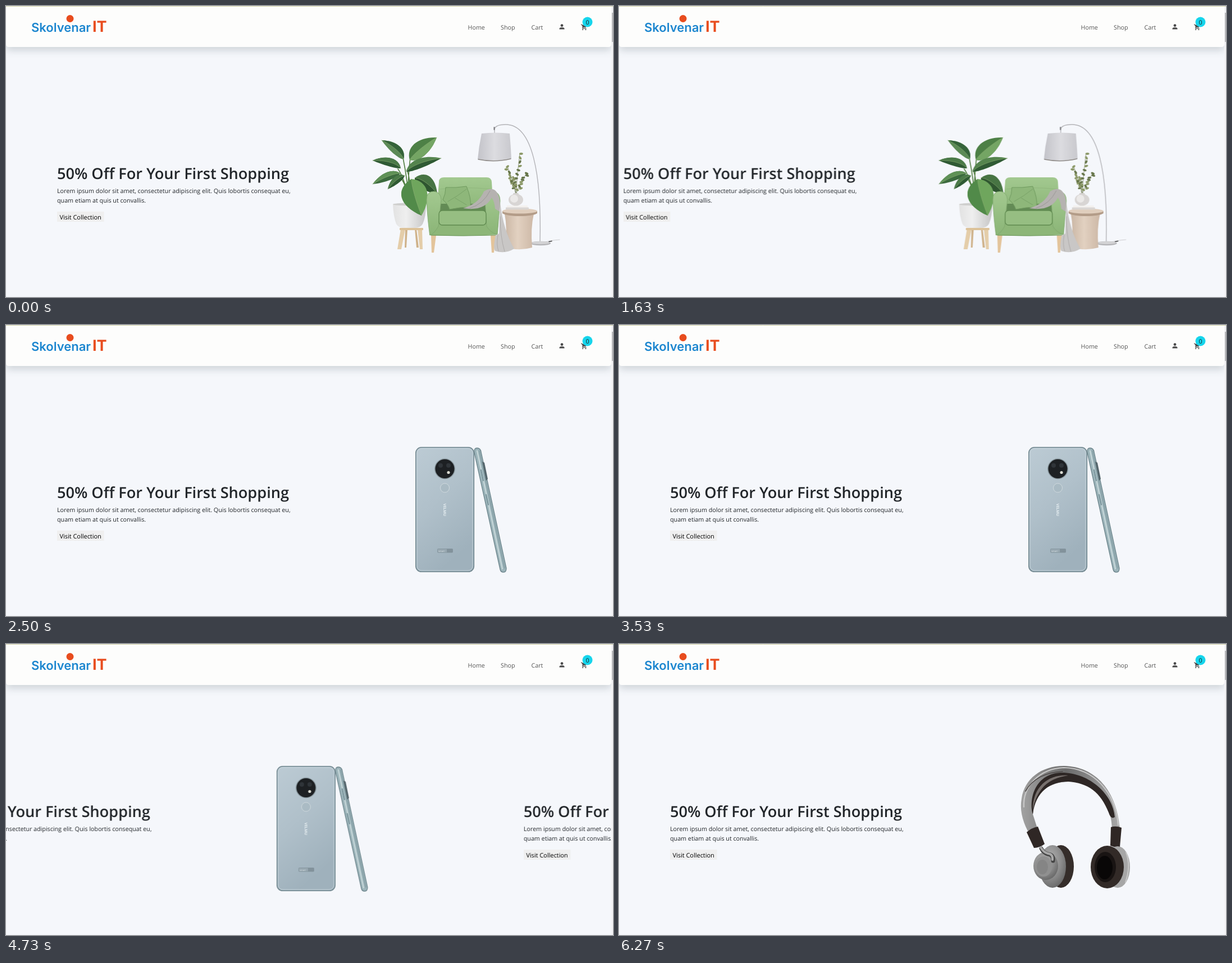
Write an HTML page that moves like this. It is 1081x518 px and loops after 6.31 s.

```html
<!DOCTYPE html>
<html lang="en">
<head>
<meta charset="utf-8">
<title>Shop carousel</title>
<style>
html, body { margin: 0; width: 100%; height: 100%; overflow: hidden; background: #f5f7fb; }
svg { display: block; width: 1081px; height: 518px; }
text { font-family: "Open Sans", "Noto Sans", sans-serif; font-size: 10.73px; fill: #212529; text-rendering: geometricPrecision; }
.title { font-size: 27.1px; font-weight: 600; }
.button { font-size: 10.95px; fill: #000; }
.nav text { fill: #555; }
.brand { font-family: Inter, sans-serif; font-size: 22px; font-weight: 600; fill: #1c86cf; }
.brand-end { font-family: Inter, sans-serif; font-size: 27px; font-weight: 700; fill: #e84c1e; }
.tiny { font-size: 6.5px; font-weight: 700; fill: #e6eef1; }
.header { filter: drop-shadow(0 6px 7px rgba(20, 40, 50, .17)); }
</style>
</head>
<body>
<svg viewBox="0 0 1081 518" xmlns="http://www.w3.org/2000/svg">
  <defs>
    <linearGradient id="shade"><stop stop-color="#c3c3c9"/><stop offset=".5" stop-color="#dcdce0"/><stop offset="1" stop-color="#c9c9ce"/></linearGradient>
    <linearGradient id="pot"><stop stop-color="#e2e2e2"/><stop offset=".4" stop-color="#efefef"/><stop offset="1" stop-color="#c6c6c6"/></linearGradient>
    <linearGradient id="table"><stop stop-color="#cbb7a5"/><stop offset=".45" stop-color="#e2d1c1"/><stop offset="1" stop-color="#cdb8a6"/></linearGradient>
    <linearGradient id="green" x2="0" y2="1"><stop stop-color="#a3c990"/><stop offset="1" stop-color="#8bb577"/></linearGradient>
    <linearGradient id="phone" x2=".4" y2="1"><stop stop-color="#bccbd4"/><stop offset=".5" stop-color="#b0c0ca"/><stop offset="1" stop-color="#9fb1bc"/></linearGradient>
    <linearGradient id="band"><stop stop-color="#a2a2a2"/><stop offset=".45" stop-color="#6b6b6b"/><stop offset="1" stop-color="#a8a8a8"/></linearGradient>
    <radialGradient id="cup" cx=".4" cy=".35" r=".7"><stop stop-color="#b2b2b2"/><stop offset=".6" stop-color="#8c8c8c"/><stop offset="1" stop-color="#666"/></radialGradient>
  </defs>

  <g id="track"></g>

  <path class="header" d="M0 0H1078V68Q1078 73 1073 73H5Q0 73 0 68Z" fill="#fdfdfc"/>
  <path d="M0 .5H1081" stroke="#d3d3a8"/>
  <circle cx="114" cy="22.5" r="6.5" fill="#e84c1e"/>
  <text class="brand" x="45" y="46">Skolvenar</text>
  <text class="brand-end" x="154" y="46">IT</text>
  <g class="nav">
    <text x="822.5" y="41.5">Home</text>
    <text x="881" y="41.5">Shop</text>
    <text x="935.5" y="41.5">Cart</text>
  </g>
  <g fill="#4b4b4b">
    <circle cx="990" cy="34.7" r="2.4"/>
    <path d="M985.5 41.5V40Q986 38 990 38T994.5 40V41.5Z"/>
    <path transform="translate(1023.4 31.4) scale(.53)" d="M7 18a2 2 0 1 0 0 4 2 2 0 0 0 0-4zM1 2v2h2l3.6 7.6-1.4 2.4c-.7 1.3.3 3 1.8 3h12v-2H7.4l1.1-2h7.5c.7 0 1.4-.4 1.7-1l3.6-6.5c.4-.7-.1-1.5-.9-1.5H5.2l-.9-2zM17 18a2 2 0 1 0 0 4 2 2 0 0 0 0-4z"/>
  </g>
  <circle cx="1035.5" cy="28.5" r="9" fill="#16d5ec"/>
  <text x="1035.5" y="32.5" text-anchor="middle">0</text>

  <rect x="1078" width="3" height="518" y="1" fill="#f3f3f5"/>
  <rect x="1079" y="12" width="2" height="52" fill="#b9b9bb"/>
</svg>
<script>
const WIDTH = 1078, LOOP = 6310;

const path = (d, fill, extra = '') => `<path d="${d}" fill="${fill}" ${extra}/>`;
const line = (d, stroke, w = 1) => path(d, 'none', `stroke="${stroke}" stroke-width="${w}" stroke-linecap="round"`);
const oval = (x, y, rx, ry, fill, extra = '') =>
  `<ellipse cx="${x}" cy="${y}" rx="${rx}" ry="${ry}" fill="${fill}" ${extra}/>`;
const box = (x, y, w, h, r, fill, extra = '') =>
  `<rect x="${x}" y="${y}" width="${w}" height="${h}" rx="${r}" fill="${fill}" ${extra}/>`;

// Leaf from base to tip: w is the half width, bend pushes the midrib sideways
function leaf(x0, y0, x1, y1, w, bend, light, dark) {
  const dx = x1 - x0, dy = y1 - y0, len = Math.hypot(dx, dy);
  const at = (k, s) => `${x0 + dx * k - dy / len * s} ${y0 + dy * k + dx / len * s}`;
  const curve = s => `C${at(.15, bend + s)} ${at(.6, bend + s)} ${x1} ${y1}`;
  const back = s => `C${at(.6, bend + s)} ${at(.15, bend + s)} ${x0} ${y0}`;
  const start = `M${x0} ${y0}`, side = w * 1.4;
  return path(start + curve(side) + back(-side), light)
    + path(start + curve(side) + back(0), dark)
    + line(start + curve(0), '#8aac70', .7);
}

function sprigs() {
  let seed = 7, out = '';
  const rnd = () => (seed = seed * 16807 % 2147483647) / 2147483647;
  for (const [x, y] of [[915, 263], [893, 286], [927, 298], [903, 306]]) {
    out += line(`M908 336Q${908 + (x - 908) * .3} ${(y + 336) / 2} ${x} ${y}`, '#76805c', .8);
    for (let k = .3; k <= 1; k += .1) {
      const px = 908 + (x - 908) * k + rnd() * 8 - 4, py = 336 + (y - 336) * k;
      out += oval(px, py, 3.4, 1.9, rnd() > .5 ? '#66754a' : '#8c9968',
        `transform="rotate(${rnd() * 140 - 70} ${px} ${py})"`);
    }
  }
  return out;
}

const lamp =
  line('M951 421C954 300 938 211 890 211Q872 211 870 219V226', '#b3b3b7', 1.4) +
  line('M869.5 216V220', '#77777b', 2) +
  line('M955 422Q968 417 986 416', '#c2c2c4', .8) + line('M967 419.5L972 418.5', '#444', 1.4) +
  oval(952, 422.5, 18, 3.8, '#b4b4b7') + oval(952, 421.5, 16, 2.6, '#d3d3d5') +
  path('M847 227Q872 224 897 227Q899 250 900 272Q870 279 840 273Q842 250 847 227Z', 'url(#shade)') +
  line('M841 273Q870 279 899 272', '#8f8b88', 1.3);

const plant =
  line('M718 355Q716 315 707 270M718 355Q714 315 720 270M718 355Q712 310 698 290M718 355Q722 310 714 292M718 355Q714 315 698 300', '#4f7c3e', 1.6) +
  leaf(728, 306, 768, 334, 12, -6, '#477443', '#2f5630') +
  leaf(708, 273, 669, 239, 8, 6, '#5c8a56', '#35633a') +
  leaf(719, 274, 767, 234, 13, -4, '#4d8046', '#74a564') +
  leaf(703, 289, 653, 275, 7, 7, '#2f5a34', '#4b7a48') +
  leaf(713, 295, 775, 271, 8, -7, '#54844e', '#2f5a34') +
  leaf(702, 298, 653, 317, 7, 4, '#3c6b3e', '#5f9156') +
  leaf(710, 302, 680, 326, 6, 4, '#2f5a34', '#4b7a48') +
  path('M703 397H711L704 433H697ZM733 397H741L742 433H737Z', '#e4cda9') +
  path('M711 397H715L713 430H710ZM728 397H731L735 430H731Z', '#cfb28a') +
  box(701, 395, 42, 4, 1, '#dcc299') +
  path('M689 353H748Q748 375 742 388Q738 395 728 395H709Q699 395 695 388Q690 375 689 353Z', 'url(#pot)') +
  oval(718.5, 353, 29.5, 2.5, '#cfcfce') +
  leaf(722, 308, 740, 373, 22, 3, '#6fa65d', '#518a49');

const chair =
  path('M757 408H766L762 439H758ZM863 408H872L869 439H865Z', '#e3c49b') +
  path('M771 313Q771 305 780 305H856Q864 305 865 313L868 366H767Z', 'url(#green)') +
  line('M773 326Q818 321 863 326', '#8db47a', .8) +
  path('M765 352H862V390H765Z', '#638b55') +
  path('M783 323Q802 324 820 321Q829 342 827 358Q808 358 790 362Q787 352 778 345Q783 335 783 323Z', '#8eb77a', 'stroke="#6f9a5e"') +
  line('M787 348Q805 338 820 326M800 342L820 354', '#79a368') +
  path('M753 384H877L875 407Q815 411 754 408Z', '#8db678') +
  path('M749 345Q749 330 762 330Q774 331 775 345L770 392Q763 405 755 408Q751 385 749 345Z', 'url(#green)', 'stroke="#7da56b" stroke-width=".8"') +
  path('M853 345Q855 330 868 330Q880 332 880 347L875 407Q862 403 856 392Z', 'url(#green)', 'stroke="#7da56b" stroke-width=".8"') +
  box(771, 364, 84, 26, 6, '#96be82', 'stroke="#5f8a4f" stroke-width="1.3"') +
  line('M757 408Q815 410 873 408', '#6b9659');

const blanket =
  path('M814 360Q842 352 851 330Q864 322 872 329Q882 340 879 366L871 361Q870 348 865 341Q852 366 814 360Z', '#b5b2b0') +
  line('M826 360Q850 353 862 329', '#9b9897') +
  path('M880 350Q886 400 905 432Q889 442 871 436Q867 430 872 408L878 405Z', '#c9c7c6') +
  line('M880 375Q880 410 888 437M876 408Q873 425 877 436', '#aeabaa');

const sideTable =
  path('M888 370Q893 395 889 429Q912 437 937 430Q934 395 940 370Z', 'url(#table)') +
  path('M884 365V369Q892 374 915 374T946 369V365Z', '#b39c88') +
  oval(915, 365, 31, 4.5, '#e0cebd') +
  box(892, 355, 37, 3.5, 1, '#f3f1ef') + box(890, 358.5, 41, 4, 1, '#dad6d3') +
  sprigs() +
  box(903, 333, 10, 6, 2, '#d2cfcd') + oval(908, 345, 13, 10.5, '#d8d5d4') + oval(905, 343, 7, 7, '#ebe9e8');

const living = lamp + plant + sideTable + chair + blanket;

const phones =
  path('M834 227Q833 219 839 219Q845 219 846 226L891 433Q891 440 886 440Q881 440 880 435Z', '#9cb4ba', 'stroke="#6b848b" stroke-width="1.3"') +
  line('M839 224L884 434', '#c8d8da', 2.2) + line('M843 224L888 433', '#829ba1', 1.4) +
  path('M848 243L852 245L858 274L855 277Z', '#55666c') +
  line('M846 258L850 277M855 302L859 320', '#78939a', 2) +
  box(729.8, 217.8, 103.5, 221.5, 10, 'url(#phone)', 'stroke="#71878f" stroke-width="1.6"') +
  box(732, 220, 99, 217, 8, 'none', 'stroke="#c9d7dd" stroke-width=".8"') +
  oval(781.5, 256, 18.5, 18.5, '#8a989f') + oval(781.5, 256, 17, 17, '#1d2023') +
  oval(774, 250, 4, 4, '#2f3439') + oval(788, 250, 4, 4, '#2f3439') + oval(788, 262.5, 2.6, 2.6, '#dcdcd3') +
  oval(781.5, 290, 8, 8, '#aabbc4', 'stroke="#d0dade"') +
  '<text class="tiny" transform="translate(779.4 329) rotate(90)" text-anchor="middle">VELMU</text>' +
  box(768.5, 398.5, 27, 6.5, 1, '#98a8b1', 'stroke="#82929b" stroke-width=".8"') +
  box(785, 398.5, 10.5, 6.5, 1, '#82929b') +
  '<text x="770" y="403.5" style="font-size:4px;fill:#dfe7ea">smart</text>';

const headphones =
  path('M728 333Q712 302 717 275C722 240 752 217 792 217C850 218 886 262 892 328H878C877 285 850 245 800 245C768 246 740 262 737 303L745 328Z', 'url(#band)') +
  path('M786 229C838 228 880 268 883 308Q876 313 872 300C858 264 835 247 800 245C768 245 742 262 737 303C730 280 738 232 786 229Z', '#2e2725') +
  path('M737 296C736 250 770 231 800 234Q772 238 757 253Q741 270 737 296Z', '#77706d') +
  line('M721 290C719 254 748 222 792 220C846 221 884 264 889 322', '#c9c9c9', 2.2) +
  line('M724 262C736 240 760 228 790 227', '#4d4847', 1.6) +
  path('M726 335Q735 327 746 325L758 356Q749 363 739 363Z', '#2f2725') +
  path('M876 326Q885 323 895 327L892 361Q884 363 875 359Z', '#2f2725') +
  oval(787, 396, 23, 38, '#352d2a') +
  oval(772, 396, 24, 38, 'url(#cup)') +
  oval(760, 395, 22, 25, 'url(#cup)') + oval(756, 396, 15, 18, '#909090') + oval(754, 397, 10, 13, '#858585') +
  line('M752 364Q756 372 764 374Q774 375 773 386', '#444', 7) +
  line('M751 362Q756 371 764 373Q773 374 772 384', '#a9a9a9', 4) +
  oval(888, 397, 22, 37, '#a6a6a6') + line('M903 371Q912 395 902 424', '#c8c8c8', 2) +
  oval(869.5, 397, 29.5, 38, '#322a27') + oval(866, 397, 19, 27, '#191413') + oval(865, 398, 14, 21, '#090707');

const copy =
  `<text class="title" x="91" y="308">50% Off For Your First Shopping</text>
   <text x="91" y="333">Lorem ipsum dolor sit amet, consectetur adipiscing elit. Quis lobortis consequat eu,</text>
   <text x="91" y="350">quam etiam at quis ut convallis.</text>
   ${box(91, 366, 83.5, 18, 0, '#efefef')}
   <text class="button" x="95.5" y="379.5">Visit Collection</text>`;

const track = document.getElementById('track');
track.innerHTML = [living, phones, headphones]
  .map((art, i) => `<g transform="translate(${i * WIDTH})">${copy}${art}</g>`).join('');

// [time in ms, slide shown, easing to the next step]
const steps = [
  [0, 0], [1520, 0, 'ease-in-out'], [2090, 1],
  [4542, 1, 'ease-in-out'], [5112, 2], [LOOP, 2]
];
track.animate(
  steps.map(([ms, slide, easing = 'linear']) =>
    ({ offset: ms / LOOP, transform: `translateX(${-slide * WIDTH}px)`, easing })),
  { duration: LOOP, iterations: Infinity }
);
</script>
</body>
</html>
```
